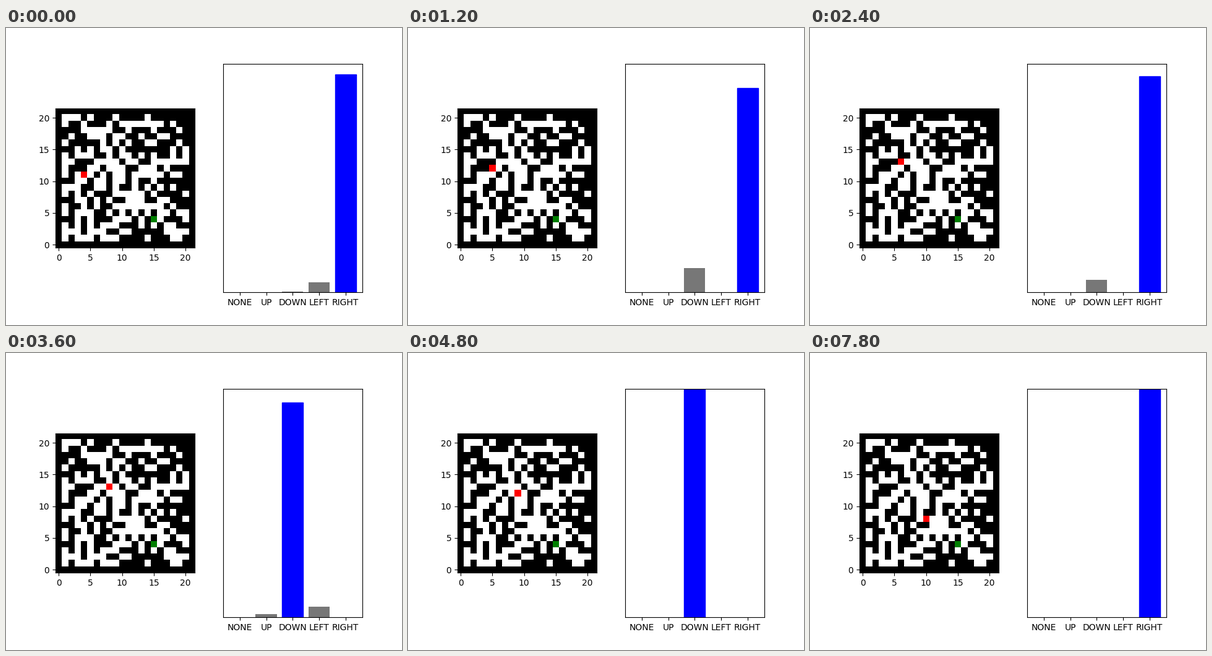
Animation of 640x480 px, one loop 8000 ms. Source, as a matplotlib script:

```python
import matplotlib.pyplot as plt
import numpy as np
from matplotlib.animation import FuncAnimation

# Level map, top row first; '#' is wall.
MAZE = """
######################
#...#.###.####.#######
#.##.###.#.......#.###
####.....##.###.###.##
##.##...#..##.##..####
#.#####.#.#.##..###.##
###.#.#..#.#######.#.#
#.#...##.#..#.#.##.#.#
#..###....#..##......#
#.###..#...##...#.####
#.#...#.#..#.....#..##
###..#..#..#.##.######
#...##..#.##.#.#.#.###
#.#.#.###.....#.####.#
###..#.#.##...##..####
#.##.#.##........#.###
#.#...##.#.#.#.#..#..#
###.#.###...#.#..###.#
#.#.#.#...###.#.#..###
#...#...##..#####....#
#.#...#...####.###..##
######################
""".split()

MOVES = {"NONE": (0, 0), "UP": (0, 1), "DOWN": (0, -1),
         "LEFT": (-1, 0), "RIGHT": (1, 0)}
ACTIONS = list(MOVES)
KEYS = {name[0]: name for name in ACTIONS}
START, GOAL = (4, 11), (15, 4)
ROUTE = "RURURRDRDDDDRR"
TICK_MS, TICKS_PER_STEP, TICKS = 200, 3, 40

# Probability of the actions not taken; the chosen one gets the rest.
DOUBTS = {
    0: {"LEFT": .044, "DOWN": .004},
    1: {"RIGHT": .15},
    2: {"DOWN": .107},
    3: {"RIGHT": .17},
    4: {"DOWN": .055},
    5: {"DOWN": .10},
    6: {"LEFT": .047, "UP": .013},
    7: {"DOWN": .012},
    9: {"UP": .003},
    10: {"RIGHT": .004},
}

path = [START]
for key in ROUTE:
    path.append(tuple(np.add(path[-1], MOVES[KEYS[key]])))

open_cells = np.array([[c == "." for c in row] for row in MAZE[::-1]], float)
grid = np.repeat(open_cells[:, :, None], 3, axis=2)
grid[GOAL[1], GOAL[0]] = (0, 0.5, 0)


def maze_at(step):
    x, y = path[step]
    img = grid.copy()
    img[y, x] = (1, 0, 0)
    return img


def policy_at(step):
    probs = dict.fromkeys(ACTIONS, 0.0)
    probs.update(DOUBTS.get(step, {}))
    probs[KEYS[ROUTE[step]]] = 1 - sum(probs.values())
    return probs


fig, (maze_ax, bar_ax) = plt.subplots(1, 2, figsize=(6.4, 4.8), dpi=100)
image = maze_ax.imshow(maze_at(0), origin="lower", interpolation="nearest")
bars = bar_ax.bar(range(5), policy_at(0).values())
bar_ax.set_xticks(range(5), ACTIONS)
bar_ax.set_yticks([])
bar_ax.set_ylim(0, 1)


def draw(tick):
    step = tick // TICKS_PER_STEP
    image.set_data(maze_at(step))
    for bar, (name, p) in zip(bars, policy_at(step).items()):
        chosen = name == KEYS[ROUTE[step]]
        bar.set_height(p)
        bar.set_facecolor("blue" if chosen else "#777777")
        bar.set_edgecolor("blue" if chosen else "none")
    return [image, *bars]


anim = FuncAnimation(fig, draw, frames=TICKS, interval=TICK_MS,
                     repeat=True, repeat_delay=0, blit=False)
plt.show()
```
